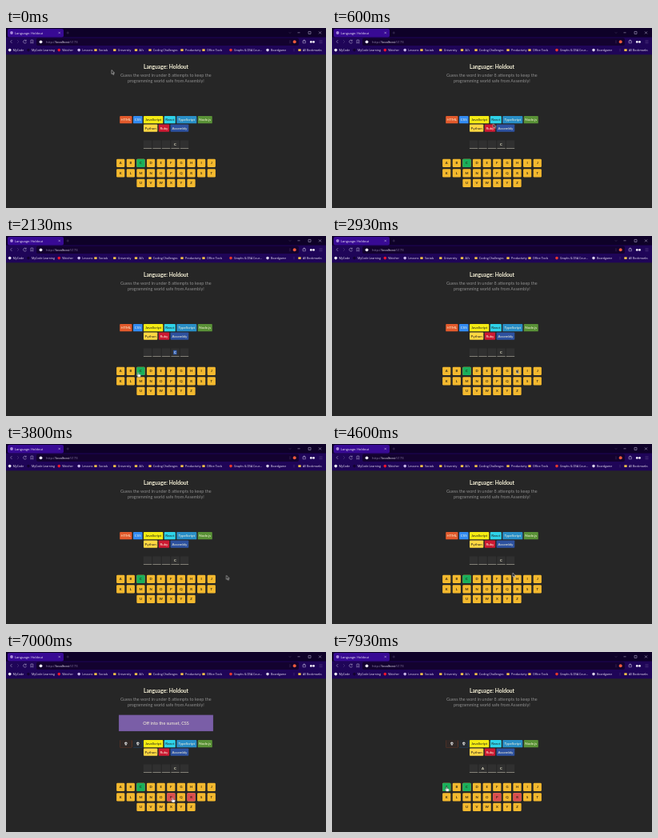
An HTML page that plays this animation: 400x225 px, repeating every 8 s.

```html
<!DOCTYPE html>
<html lang="en">
<head>
<meta charset="utf-8">
<title>Word game</title>
<style>
html, body { margin: 0; height: 100%; overflow: hidden; background: #262626; }
svg { display: block; width: 100vw; height: 100vh; }
text { font-family: Lato, sans-serif; text-anchor: middle; fill: #f9f4da; }
.ui text { font-family: "Open Sans", sans-serif; text-anchor: start; fill: #eee9f7; }
.line { fill: none; stroke: #c9c0e0; stroke-width: .5; }
.faint { opacity: .35; }

.step, .cursor, .cursor > * { animation: 8s step-end infinite; }
.lost-html { animation-name: lost-html; }
.lost-css { animation-name: lost-css; }
.found-a { animation-name: found-a; }
.message { animation-name: message; }
.say-html { animation-name: say-html; }
.selection { animation-name: selection; }
.cursor { animation-name: travel; animation-timing-function: ease-in-out; }
.cursor .arrow { animation-name: arrow; }
.cursor .hand { animation-name: hand; }

@keyframes lost-html { 0% { opacity: 0 } 66.6%, 100% { opacity: 1 } }
@keyframes lost-css { 0% { opacity: 0 } 83.8%, 100% { opacity: 1 } }
@keyframes found-a { 0% { opacity: 0 } 95.6%, 100% { opacity: 1 } }
@keyframes message { 0% { opacity: 0 } 66.6% { opacity: 1 } 95.6%, 100% { opacity: 0 } }
@keyframes say-html { 0% { opacity: 1 } 83.8%, 100% { opacity: 0 } }
@keyframes selection { 0% { opacity: 0 } 18.3% { opacity: 1 } 34%, 100% { opacity: 0 } }
@keyframes arrow { 0% { opacity: 1 } 24.3% { opacity: 0 } 31% { opacity: 1 } 63.5%, 100% { opacity: 0 } }
@keyframes hand { 0% { opacity: 0 } 24.3% { opacity: 1 } 31% { opacity: 0 } 63.5%, 100% { opacity: 1 } }
@keyframes travel {
  0%, 1% { transform: translate(132px, 52.5px) }
  11%, 13.6% { transform: translate(224.9px, 142.5px) }
  17.5%, 19% { transform: translate(210px, 145px) }
  25%, 30% { transform: translate(165.3px, 170.3px) }
  42%, 48% { transform: translate(275.5px, 164.3px) }
  55% { transform: translate(238px, 150px) }
  60% { transform: translate(214px, 172px) }
  65.5%, 74% { transform: translate(231.3px, 181px) }
  82%, 89% { transform: translate(208.3px, 182px) }
  95%, 100% { transform: translate(143.3px, 168.2px) }
}
</style>
</head>
<body>
<svg id="stage" viewBox="0 0 400 225" preserveAspectRatio="none"></svg>
<script>
const rect = (x, y, w, h, fill, extra = '') =>
  `<rect x="${x}" y="${y}" width="${w}" height="${h}" fill="${fill}" ${extra}/>`;
const text = (x, y, size, words, extra = '') =>
  `<text x="${x}" y="${y}" font-size="${size}" ${extra}>${words}</text>`;
const dot = (x, y, r, fill) => `<circle cx="${x}" cy="${y}" r="${r}" fill="${fill}"/>`;
const line = (d, kind = '') => `<path class="line ${kind}" d="${d}"/>`;
const step = (name, body) => `<g class="step ${name}">${body}</g>`;

function browser() {
  const folder = x => rect(x - 1.7, 26.2, 3.4, 2.8, '#f0c04a', 'rx=".4"');
  const marks = [
    [8.7, 'MyCode', '#f4f0fa'], [32, 'MyCode Learning', '#14032f'],
    [70.3, 'Watcher', '#f0142d'], [95.2, 'Lessons', '#c9b8e8'],
    [116, 'Socials'], [139.8, 'University'], [166.5, 'AI\'s'],
    [184, 'Coding Challenges'], [224, 'Productivity'], [251, 'Office Tools'],
    [285, 'Graphs &amp; DSA Cour...', '#e8382e'], [331, 'Boardgame', '#d9d2e8'],
    [371, 'All Bookmarks']
  ];
  return `<g class="ui">
    ${rect(0, 0, 400, 12, '#0e0128')}
    ${rect(0, 11.5, 400, 21.8, '#1f0558')}
    ${rect(2, 1, 70, 10.5, '#380a94', 'rx="2"')}
    ${dot(7, 6, 1.9, '#a98bdc')}
    ${text(11, 7.5, 4, 'Language: Holdout')}
    ${line('M65.5 4.8l2.4 2.4m0-2.4l-2.4 2.4')}
    ${line('M75.5 6h3.4m-1.7-1.7v3.4', 'faint')}
    ${line('M353.8 5.3l1.2 1.2 1.2-1.2', 'faint')}
    ${line('M364.5 5.8h3M378 4.4h3v3h-3zM391 4.4l3 3m0-3l-3 3')}
    ${rect(38, 12.6, 328, 9.4, '#13022f', 'rx="2"')}
    ${line('M7.5 15l-2 2 2 2')}${line('M14 15l2 2-2 2', 'faint')}
    ${line('M25 15.7a2 2 0 1 0 .5 2m-.3-3v1.5h-1.5M31 15h2.8v4.2l-1.4-1.2-1.4 1.2z')}
    ${dot(43.5, 17.3, 1.9, '#eee9f7')}
    <text x="50" y="18.6" font-size="4.1"><tspan fill="#8f83a9">http://</tspan>localhost<tspan fill="#8f83a9">:5173</tspan></text>
    ${line('M355 15.3v4', 'faint')}
    ${dot(360.7, 17.3, 2, '#ee5a3c')}
    ${line('M371 16h3.4v2.8H371zM372 16v-1h1.4v1')}
    ${dot(381.3, 17.4, 1.4, '#f4f0fa')}${dot(384.5, 17.4, 1.4, '#f4f0fa')}
    ${line('M391.5 15.7h4m-4 1.6h4m-4 1.6h4', 'faint')}
    ${marks.map(([x, name, color]) =>
      (color ? dot(x - 4, 27.6, 1.8, color) : folder(x - 4)) + text(x, 28.9, 3.55, name)).join('')}
    ${line('M360 25.8v3.6', 'faint')}
  </g>`;
}

function skull(x, y) {
  return `<ellipse cx="${x}" cy="${y - .4}" rx="1.8" ry="1.6" fill="#e4e4e4"/>` +
    rect(x - 1, y + .7, 2, 1.3, '#d4d4d4') +
    dot(x - .7, y - .2, .5, '#222') + dot(x + .7, y - .2, .5, '#222');
}

function languages() {
  const chips = [
    ['HTML', 142.2, 110, 15.3, '#e25a2c', 1], ['CSS', 159, 110, 11.6, '#328af1', 1],
    ['JavaScript', 172, 110, 24.3, '#f4eb13'], ['React', 197.8, 110, 14, '#2ed3e9'],
    ['TypeScript', 213.3, 110, 25, '#298ec6', 1], ['Node.js', 239.8, 110, 18, '#599137', 1],
    ['Python', 172, 120.4, 17.3, '#ffd742'], ['Ruby', 190.8, 120.4, 13.3, '#cc1a33', 1],
    ['Assembly', 205.6, 120.4, 22.7, '#2d519f', 1]
  ];
  return chips.map(([name, x, y, w, color, light]) => {
    const middle = x + w / 2;
    const chip = rect(x, y, w, 9.3, color, 'rx=".9"') +
      text(middle, y + 6.2, 4.5, name, `style="fill:${light ? '#f9f4da' : '#1e1e1e'}"`);
    if (name !== 'HTML' && name !== 'CSS') return chip;
    return chip + step('lost-' + name.toLowerCase(),
      rect(x, y, w, 9.3, '#262626') + rect(x, y, w, 9.3, color, 'rx=".9" opacity=".06"') +
      skull(middle, y + 4.5));
  }).join('');
}

function slots() {
  const boxes = [0, 1, 2, 3, 4].map(i => {
    const x = 171.9 + i * 11.5;
    return rect(x, 140.5, 10.3, 10, '#303030') + rect(x, 150.2, 10.3, .5, '#d8d4c2');
  }).join('');
  const letter = (x, name) => text(x, 147, 4.3, name, 'font-weight="700"');
  return boxes + step('selection', rect(209.2, 142.8, 4.2, 5.4, '#315fba')) +
    letter(211.3, 'C') + step('found-a', letter(188.4, 'A'));
}

function keyboard() {
  const states = {
    A: ['found-a', '#1ab05c'], C: ['', '#1ab05c'],
    R: ['lost-html', '#dc4e50'], P: ['lost-css', '#dc4e50']
  };
  return ['ABCDEFGHIJ', 'KLMNOPQRST', 'UVWXYZ'].map((row, r) =>
    [...row].map((name, i) => {
      const x = 200 + (i - (row.length - 1) / 2) * 12.62, y = 168.8 + r * 12.5;
      const cap = color => rect(x - 5.1, y - 5.1, 10.2, 10.2, color, 'rx="1.2"');
      const [when, color] = states[name] || [];
      return cap('#f4b92e') + (color ? when ? step(when, cap(color)) : cap(color) : '') +
        text(x, y + 1.5, 4.2, name, 'font-weight="700" style="fill:#2a2416"');
    }).join('')).join('');
}

const message = step('message',
  rect(141, 78.7, 118, 20.3, '#7a5ea7', 'stroke="#4b3e60" stroke-width=".4" stroke-dasharray="1.2 .8"') +
  step('say-html', text(200, 90.7, 5.5, 'Oh no, not HTML!')) +
  step('lost-css', text(200, 90.7, 5.5, 'Off into the sunset, CSS')));

const cursor = `<g class="cursor">
  <path class="arrow" d="M0 0v5l1.2-1 .9 1.9.9-.4-.9-1.8h1.6z" fill="#161616" stroke="#f4f4f4" stroke-width=".5"/>
  <path class="hand" d="M-.6.5q.6-.9 1.2 0v2l2.2.5q.6.2.4 1l-.5 2h-3l-1.8-2.3q0-.8.8-.5l.7.6z" fill="#fff" stroke="#222" stroke-width=".3"/>
</g>`;

document.getElementById('stage').innerHTML = [
  rect(0, 0, 400, 225, '#262626'),
  browser(),
  text(200, 50.5, 6.7, 'Language: Holdout', 'font-weight="700"'),
  text(199.8, 60.5, 5.45, 'Guess the word in under 8 attempts to keep the', 'style="fill:#8e8e8e"'),
  text(199.8, 67.8, 5.45, 'programming world safe from Assembly!', 'style="fill:#8e8e8e"'),
  message, languages(), slots(), keyboard(), cursor
].join('');
</script>
</body>
</html>
```
